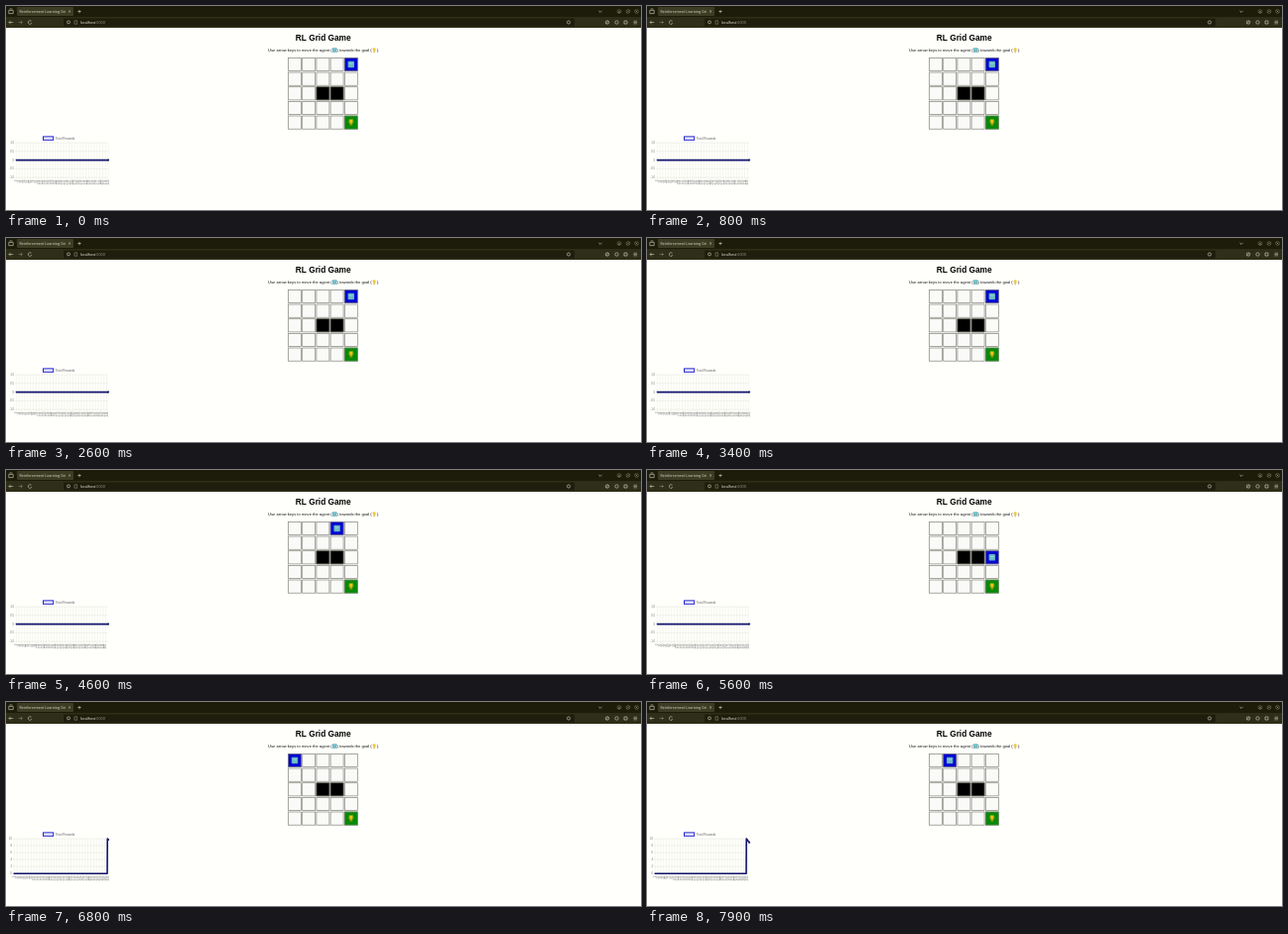
These frames come from a looping animation (640 by 206 pixels, 8000 ms). An HTML page with a canvas:

```html
<!DOCTYPE html>
<html lang="en">
<head>
<meta charset="utf-8">
<title>RL Grid Game</title>
<style>
html, body { margin: 0; width: 100%; height: 100%; overflow: hidden; background: #fffffb; }
canvas { display: block; width: 640px; height: 206px; }
</style>
</head>
<body>
<canvas id="stage" width="640" height="206"></canvas>
<script>
const ctx = document.getElementById('stage').getContext('2d');
const SANS = '"Liberation Sans", Arial, sans-serif';
const UI = '"Noto Sans", "Open Sans", sans-serif';
const STEP = 100, STEPS = 80;
const START_POINTS = 430;
const NAVY = '#14146e';
const MOVES =
  'RULRUDURRULLRRUDU' + 'URDUULRRUDDUURLRU' + 'RULLDURRUULU' +
  'LRRUDRUDRD' + 'RDULRDRD' + '-' + 'ULU' + 'RLUDUULRRLU';
const DIR = { L: [-1, 0], R: [1, 0], U: [0, -1], D: [0, 1] };

const isWall = (x, y) => y === 2 && (x === 2 || x === 3);
const isGoal = (x, y) => x === 4 && y === 4;

// Walk the agent once; it returns to the first cell after the goal.
const path = [[4, 0]];
let goalStep = STEPS;
for (let i = 0; i < STEPS - 1; i++) {
  const [x, y] = path[i];
  if (isGoal(x, y)) {
    path.push([0, 0]);
    continue;
  }
  const [dx, dy] = DIR[MOVES[i]] || [0, 0];
  const nx = Math.min(4, Math.max(0, x + dx));
  const ny = Math.min(4, Math.max(0, y + dy));
  path.push(isWall(nx, ny) ? [x, y] : [nx, ny]);
  if (isGoal(nx, ny)) goalStep = i + 1;
}

function rect(x, y, w, h, color) {
  ctx.fillStyle = color;
  ctx.fillRect(x, y, w, h);
}

function round(x, y, w, h, r, color) {
  ctx.fillStyle = color;
  ctx.beginPath();
  ctx.roundRect(x, y, w, h, r);
  ctx.fill();
}

function line(points, color, width) {
  ctx.strokeStyle = color;
  ctx.lineWidth = width;
  ctx.beginPath();
  points.forEach(([x, y], i) => i ? ctx.lineTo(x, y) : ctx.moveTo(x, y));
  ctx.stroke();
}

function ring(x, y, r, color, from = 0, to = 7) {
  ctx.strokeStyle = color;
  ctx.lineWidth = 0.6;
  ctx.beginPath();
  ctx.arc(x, y, r, from, to);
  ctx.stroke();
}

function text(str, x, y, font, color, align = 'left') {
  ctx.font = font;
  ctx.fillStyle = color;
  ctx.textAlign = align;
  ctx.fillText(str, x, y);
  return ctx.measureText(str).width;
}

function robot(cx, cy, s) {
  round(cx - s / 2, cy - s / 2, s, s, s * 0.12, '#5fb4c2');
  rect(cx - s * 0.3, cy - s * 0.22, s * 0.6, s * 0.16, '#a9dbe0');
  rect(cx - s * 0.25, cy + s * 0.12, s * 0.5, s * 0.14, '#8cc9d2');
}

function trophy(cx, cy, s) {
  const gold = '#f0c020';
  ring(cx, cy - s * 0.2, s * 0.38, gold, 0, Math.PI);
  ctx.fillStyle = gold;
  ctx.beginPath();
  ctx.moveTo(cx - s * 0.32, cy - s * 0.5);
  ctx.lineTo(cx + s * 0.32, cy - s * 0.5);
  ctx.quadraticCurveTo(cx + s * 0.3, cy + s * 0.08, cx, cy + s * 0.12);
  ctx.quadraticCurveTo(cx - s * 0.3, cy + s * 0.08, cx - s * 0.32, cy - s * 0.5);
  ctx.fill();
  rect(cx - s * 0.08, cy, s * 0.16, s * 0.35, gold);
  rect(cx - s * 0.24, cy + s * 0.3, s * 0.48, s * 0.18, '#b98d18');
}

function browser() {
  const pale = '#d8d8c4', dim = '#9a9a84';
  rect(0, 0, 640, 11, '#1d1c0a');
  rect(0, 11, 640, 11, '#2f2e18');
  round(11, 1, 57, 9, 1, '#3d3c24');
  line([[2.8, 4.4], [7.2, 4.4], [7.2, 7.6], [2.8, 7.6], [2.8, 4.4]], pale, 0.6);
  line([[3.6, 3], [6.4, 3]], pale, 0.6);
  text('Reinforcement Learning Gri', 13.5, 7, '3.6px ' + UI, pale);
  line([[63.2, 4.6], [65, 6.4]], pale, 0.5);
  line([[65, 4.6], [63.2, 6.4]], pale, 0.5);
  line([[72.4, 5.5], [75.6, 5.5]], pale, 0.6);
  line([[74, 3.9], [74, 7.1]], pale, 0.6);
  line([[597.4, 4.8], [599, 6.4], [600.6, 4.8]], pale, 0.6);
  for (const x of [618, 627, 635.5]) ring(x, 5.5, 1.9, '#77765c');
  line([[617, 6], [619, 6]], pale, 0.6);
  line([[626.2, 6.3], [627.8, 4.7]], pale, 0.6);
  line([[634.7, 4.7], [636.3, 6.3]], pale, 0.6);

  line([[7.2, 16.5], [3, 16.5], [4.7, 14.8]], pale, 0.6);
  line([[3, 16.5], [4.7, 18.2]], pale, 0.6);
  line([[12.6, 16.5], [16.4, 16.5], [14.8, 14.8]], dim, 0.5);
  line([[16.4, 16.5], [14.8, 18.2]], dim, 0.5);
  ring(24.2, 16.5, 1.8, pale, 0.4, 5.6);

  round(58, 12.6, 515, 7.8, 1, '#1f1e0d');
  ring(63, 16.4, 1.5, pale);
  line([[69, 14.8], [71.6, 14.8], [71.6, 18.2], [69, 18.2], [69, 14.8]], dim, 0.5);
  const w = text('localhost', 74.8, 17.8, '3.7px ' + UI, '#e6e6d6');
  text(':5000', 74.8 + w, 17.8, '3.7px ' + UI, dim);
  ring(567, 16.5, 1.6, pale);
  ring(606, 16.5, 1.7, pale);
  line([[604.6, 18], [607.4, 15]], pale, 0.5);
  ring(615.5, 16.5, 1.7, pale);
  line([[623, 15], [626, 15], [626, 18], [623, 18], [623, 15]], pale, 0.6);
  for (const dy of [-1.3, 0, 1.3]) {
    line([[632.5, 16.5 + dy], [636, 16.5 + dy]], pale, 0.5);
  }
}

function heading() {
  text('RL Grid Game', 319.7, 34.8, 'bold 8.3px ' + SANS, '#000', 'center');
  const font = '4.1px ' + SANS;
  let x = 264;
  x += text('Use arrow keys to move the agent (', x, 46, font, '#111');
  robot(x + 2.6, 44.5, 4.4);
  x += 5;
  x += text(') towards the goal (', x, 46, font, '#111');
  trophy(x + 2.5, 44.5, 4.2);
  text(').', x + 5, 46, font, '#111');
}

function board(ax, ay) {
  for (let y = 0; y < 5; y++) {
    for (let x = 0; x < 5; x++) {
      const px = 284.2 + x * 14.2, py = 52.1 + y * 14.65;
      const here = x === ax && y === ay;
      const fill = here ? '#0505d2' : isGoal(x, y) ? '#078a07' :
        isWall(x, y) ? '#000' : '#fafaf8';
      rect(px, py, 13.6, 13.8, fill);
      ctx.strokeStyle = '#85857c';
      ctx.lineWidth = 0.7;
      ctx.strokeRect(px + 0.3, py + 0.3, 13, 13.2);
      if (here) robot(px + 6.8, py + 6.9, 6.4);
      else if (isGoal(x, y)) trophy(px + 6.8, py + 6.9, 6);
    }
  }
}

function chart(step) {
  const won = step >= goalStep;
  const left = won ? 8.2 : 10.4, right = 103, top = 138, bottom = 173.2;
  const min = won ? 0 : -1, max = won ? 10 : 1, gap = won ? 2 : 0.5;
  const count = START_POINTS + step;
  const toX = i => left + (right - left) * i / (count - 1);
  const toY = v => bottom - (bottom - top) * (v - min) / (max - min);
  const font = '2.9px ' + SANS;

  rect(37, 131.4, 11.2, 4.4, '#2323cc');
  rect(38, 132.4, 9.2, 2.4, '#ececfa');
  text('Total Rewards', 49.8, 134.7, '3.1px ' + SANS, '#666');

  const grid = 'rgba(90,90,50,.13)';
  for (let v = min; v <= max; v += gap) {
    line([[left - 1.5, toY(v)], [right, toY(v)]], grid, 0.5);
    const label = won || v === 0 ? String(v) : v.toFixed(1);
    text(label, left - 2.2, toY(v) + 1, font, '#777', 'right');
  }
  const skip = Math.ceil(count / 34);
  for (let i = 0; i < count; i += skip) {
    const x = toX(i);
    line([[x, top], [x, bottom + 1.5]], grid, 0.4);
    ctx.save();
    ctx.translate(x + 1, bottom + 2.4);
    ctx.rotate(-Math.PI / 2);
    text(String(i), 0, 0, font, '#777', 'right');
    ctx.restore();
  }

  const points = [[left, toY(0)]];
  const goalIndex = START_POINTS + goalStep - 1;
  if (won) {
    points.push([toX(goalIndex - 1), toY(0)]);
    for (let i = goalIndex; i < count; i++) {
      points.push([toX(i), toY(10 - 0.07 * (i - goalIndex))]);
    }
  } else {
    points.push([right, toY(0)]);
  }
  ctx.lineCap = 'round';
  ctx.lineJoin = 'round';
  line(points, NAVY, 1.6);
  ctx.lineCap = 'butt';
  ctx.lineJoin = 'miter';
  ctx.fillStyle = NAVY;
  const [ex, ey] = points[points.length - 1];
  ctx.beginPath();
  ctx.arc(ex, ey, 1, 0, 7);
  ctx.fill();
}

function draw(now) {
  const step = Math.floor(now / STEP) % STEPS;
  rect(0, 0, 640, 206, '#fffffb');
  browser();
  heading();
  board(...path[step]);
  chart(step);
}

const begin = performance.now();
function tick() {
  draw(performance.now() - begin);
  requestAnimationFrame(tick);
}
tick();
</script>
</body>
</html>
```
